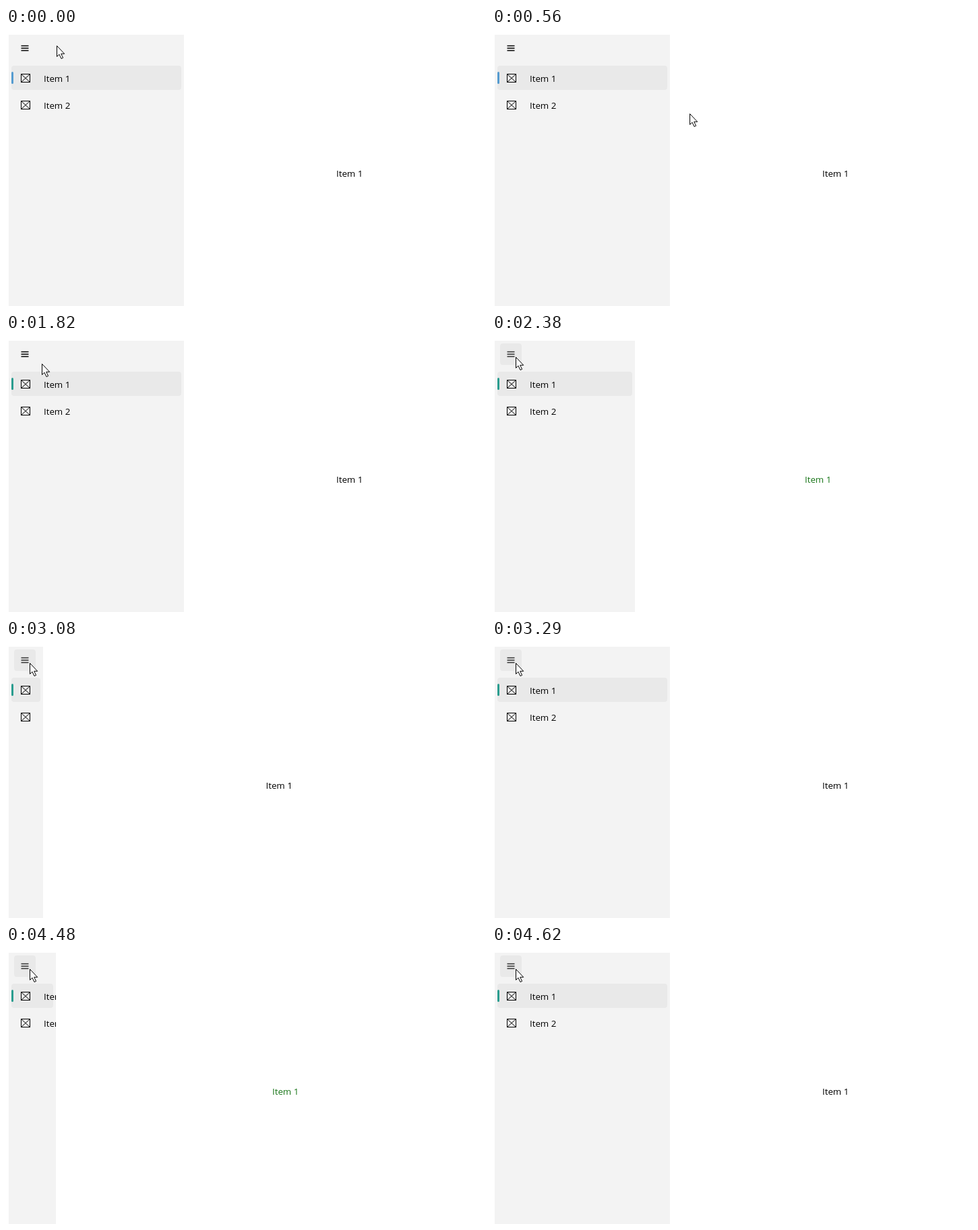
These frames come from a looping animation (712x413 px, 5180 ms). An HTML page:

```html
<!DOCTYPE html>
<html lang="en">
<head>
<meta charset="utf-8">
<title>Collapsible navigation pane</title>
<style>
  html, body { margin: 0; width: 100%; height: 100%; overflow: hidden; background: #fff; }
  svg { display: block; }
  text { font: 13.3px "Open Sans", "Noto Sans", sans-serif; fill: #000; }
  .hover { fill: #e9e9e9; }
  .line { fill: none; stroke: #000; }
</style>
</head>
<body>
<svg width="712" height="413" viewBox="0 0 712 413">
  <defs>
    <g id="box" class="line">
      <rect x="22.5" y="68.5" width="13" height="12"/>
      <path d="M22.5 68.5l13 12m0-12l-13 12"/>
    </g>
  </defs>
  <svg id="pane" x="4" y="10" height="403">
    <g transform="translate(-4 -10)">
      <rect width="712" height="413" fill="#f3f3f3"/>
      <rect id="menuHover" class="hover" x="12" y="14" width="32" height="32" rx="4"/>
      <path id="menu" class="line" stroke-width="1.4" d="M22.5 26.5h11m-11 3.5h11m-11 3.5h11"/>
      <rect id="row0" class="hover" x="8" y="56" height="36" rx="4"/>
      <rect id="row1" class="hover" x="8" y="96" height="36" rx="4"/>
      <rect id="bar" x="8" width="3" rx="1.5"/>
      <use href="#box"/>
      <use href="#box" y="40"/>
      <text x="56" y="80">Item 1</text>
      <text x="56" y="120">Item 2</text>
    </g>
  </svg>
  <text id="page" y="221"></text>
  <path id="cursor" d="M.5.5v16l3.5-3.3 3 6.3 2.6-1.2-2.9-6h5z" fill="#fff" stroke="#000"/>
</svg>
<script>
const LOOP = 5180, TICK = 70;
const OPEN = 264, CLOSED = 52, SLIDE = 174;
const PICK_2 = 1120, PICK_1 = 1610;

// pointer moves: start, end, x, y
const home = [75, 26];
const moves = [
  [210, 490, 316, 161],
  [490, 560, 293, 127],
  [560, 770, 127, 123],
  [840, 980, 111, 123],
  [1050, 1470, 105, 72],
  [1540, 1960, 35, 34]
];
// start of each slide, alternately closing and opening
const toggles = [2324, 3068, 3819, 4445];

const $ = id => document.getElementById(id);
const set = (id, attrs) => {
  for (const name in attrs) $(id).setAttribute(name, attrs[name]);
};
const ease = u => {
  u = Math.min(1, Math.max(0, u));
  return u * u * (3 - 2 * u);
};

function pointer(t) {
  let [x, y] = home;
  for (const [start, end, toX, toY] of moves) {
    const u = ease((t - start) / (end - start));
    x += (toX - x) * u;
    y += (toY - y) * u;
  }
  return [Math.round(x), Math.round(y)];
}

// 0 when the pane is open, 1 when it is closed
const shutAt = t => toggles.reduce((sum, start, i) =>
  sum + (i % 2 ? -1 : 1) * ease((t - start) / SLIDE), 0);

// The leading end of the marker moves first, then the trailing end follows.
function marker(t) {
  const move = (start, lag) => ease((t - start + 10) / 75 - lag);
  const top = 65 + 40 * (move(PICK_2, 1) - move(PICK_1, 0));
  const bottom = 83 + 40 * (move(PICK_2, 0) - move(PICK_1, 1));
  return { y: top, height: bottom - top };
}

function draw(now) {
  const t = Math.floor(now % LOOP / TICK) * TICK;
  const [x, y] = pointer(t);
  const shut = shutAt(t);
  const edge = Math.round(OPEN + (CLOSED - OPEN) * shut);
  const sliding = shut > .05 && shut < .95;
  const chosen = t >= PICK_2 && t < PICK_1 ? 1 : 0;
  const over = (left, top, right, bottom) =>
    x >= left && x < right && y >= top && y < bottom;
  const overMenu = over(12, 14, 44, 46);

  set("pane", { width: edge - 4 });
  set("menuHover", { opacity: +overMenu });
  set("menu", { style: `stroke: ${overMenu ? "#333" : "#000"}` });
  for (const i of [0, 1]) {
    const top = 56 + 40 * i;
    const lit = i === chosen || over(8, top, edge - 4, top + 36);
    set("row" + i, { width: edge - 12, opacity: +lit });
  }
  set("bar", {
    ...marker(t),
    fill: t < PICK_2 ? "#559bd0" : t < PICK_1 ? "#7d9db3" : "#2a9d8f"
  });
  set("page", {
    x: 490 + (edge - OPEN) / 2,
    style: `fill: ${sliding ? "#187518" : "#000"}`
  });
  $("page").textContent = "Item " + (chosen + 1);
  set("cursor", { transform: `translate(${x} ${y})` });
}

let begin;
function loop(now) {
  begin ??= now;
  draw(now - begin);
  requestAnimationFrame(loop);
}
draw(0);
requestAnimationFrame(loop);
</script>
</body>
</html>
```
